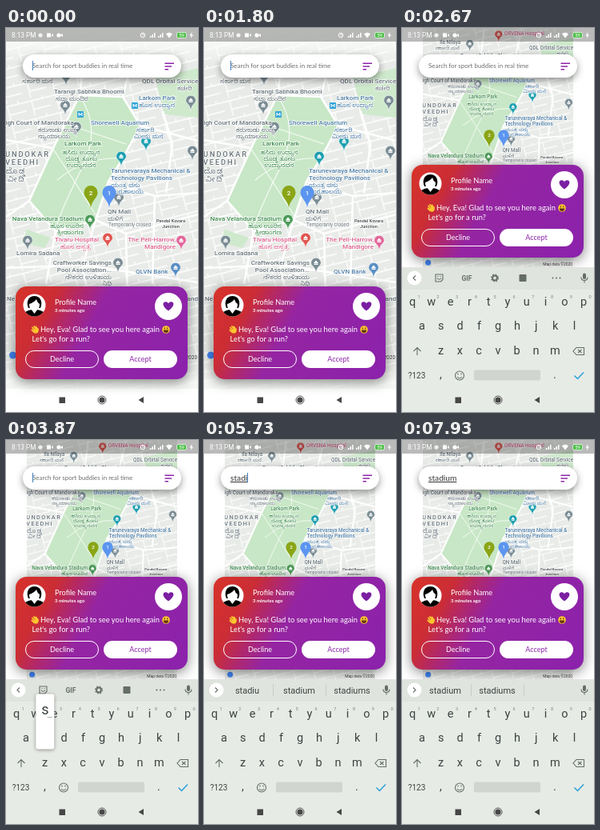
Animation, 240 px wide and 480 px high, one loop 8 s. Source, as an HTML page:

```html
<!DOCTYPE html>
<html lang="en">
<head>
<meta charset="utf-8">
<title>Search on a map</title>
<style>
html, body { margin: 0; width: 100%; height: 100%; overflow: hidden; background: #fff; }
svg { position: absolute; left: 0; top: 0; width: 240px; height: 480px; }
text { font-family: Roboto, sans-serif; }
.mid { text-anchor: middle; }
.end { text-anchor: end; }

#map { animation: map 8s step-end infinite; }
#card { animation: card 8s step-end infinite; }
#board { animation: board 8s linear infinite; }
@keyframes map {
  0% { transform: none; }
  23.3% { transform: translate(26px, -27px) scale(.783); }
}
@keyframes card {
  0% { transform: none; }
  23.3% { transform: translateY(-152px); }
}
@keyframes board {
  0%, 22.8% { transform: translateY(185px); animation-timing-function: cubic-bezier(.333, 1, .667, 1); }
  26.6%, 100% { transform: none; }
}

#map text { font-size: 8.1px; font-weight: 500; fill: #66737a; stroke: #fff; stroke-width: 1.4px; paint-order: stroke; }
#map .kn { font-size: 7.6px; font-family: "Noto Sans Kannada", "Noto Sans", sans-serif; }
#map .park { fill: #3b8a4b; }
#map .pink { fill: #dd5f8d; }
#map .blue { fill: #4f7fa8; }
#map .area { font-size: 9.4px; letter-spacing: 1.8px; }
#map .small { font-size: 6.3px; font-weight: 400; }
#map .tiny { font-size: 5.6px; fill: #3f4648; }
#map .num { font-size: 8px; fill: #fff; stroke: none; }
.pin { stroke: #fff; stroke-width: .6; }

.bar { filter: drop-shadow(0 3px 5px rgba(0, 0, 0, .42)); }
.sheet { filter: drop-shadow(0 3px 8px rgba(0, 0, 0, .5)); }
#card text { font-family: Lato, "Open Sans", sans-serif; fill: #fff; font-size: 9.4px; }
#card .name { font-size: 9.2px; }
#card .ago { font-size: 6px; font-weight: 700; }
#card .btn { font-size: 9px; }

#field { position: absolute; left: 33px; top: 39px; height: 16px; white-space: pre;
  font: 7.95px/16px Lato, "Open Sans", sans-serif; color: #6c706c; }
#field.typed { font-size: 10.2px; color: #333; }
#field.typed span { text-decoration: underline; text-decoration-thickness: 1px; text-underline-offset: 1px; }
#caret { position: absolute; left: 0; top: 2px; width: 1px; height: 12px; background: #3f7fc0; }
#field.typed #caret { left: 100%; }

#board { fill: #3c4343; }
#board .key { font-size: 14.5px; }
#board .digit { font-size: 5.6px; fill: #7d868b; }
#board .word { font-size: 11px; }
.line { fill: none; stroke: #656d67; stroke-width: 1.1; }
.pop { filter: drop-shadow(0 1px 2px rgba(0, 0, 0, .4)); }
</style>
</head>
<body>
<svg viewBox="0 0 240 480">
  <defs>
    <clipPath id="stage"><rect width="240" height="451"/></clipPath>
    <clipPath id="face"><circle cx="35.5" cy="346.5" r="14"/></clipPath>
    <pattern id="streets" width="31" height="23" patternUnits="userSpaceOnUse" patternTransform="rotate(-14)">
      <path d="M0 4H31M9 4V23M23 0V4M9 15H31" fill="none" stroke="#fff" stroke-width="1.3"/>
    </pattern>
    <linearGradient id="haze" x2="0" y2="1">
      <stop stop-color="#fbfdfa"/><stop offset=".04" stop-color="#fbfdfa" stop-opacity=".75"/>
      <stop offset=".1" stop-color="#fbfdfa" stop-opacity="0"/>
      <stop offset=".92" stop-color="#fbfdfa" stop-opacity="0"/><stop offset=".98" stop-color="#fbfdfa" stop-opacity=".7"/>
    </linearGradient>
    <linearGradient id="glow" gradientUnits="userSpaceOnUse" x1="12" y1="323" x2="227" y2="439">
      <stop stop-color="#d8332a"/><stop offset=".2" stop-color="#cb2d35"/>
      <stop offset=".31" stop-color="#b0286c"/><stop offset=".43" stop-color="#9525a2"/>
      <stop offset="1" stop-color="#8b22ac"/>
    </linearGradient>
    <g id="drop">
      <path class="pin" d="M0 9C-1-1-6.3 0-6.3-4.5A6.3 6.3 0 0 1 6.3-4.5C6.3 0 1-1 0 9Z"/>
      <path d="M-3-4L0-7.5L3-4ZM-2.5-3.5H2.5V-2H-2.5Z" fill="#fff"/>
    </g>
    <path id="flag" d="M0 19C-1 9-8.5 7-8.5-.5A8.5 8.5 0 0 1 8.5-.5C8.5 7 1 9 0 19Z"/>
  </defs>

  <g id="map">
    <g clip-path="url(#stage)">
      <rect width="240" height="451" fill="#e8ebe7"/>
      <rect width="240" height="451" fill="url(#streets)"/>
      <path d="M92 84L146 86L168 122L146 163L128 192L113 240L62 253L29 215L58 150Z" fill="#c8e7c6"/>
      <path d="M186 62L240 50V112L198 108ZM26 252L56 262L48 275L20 268Z" fill="#cfe9cd"/>
      <g fill="none" stroke="#fff" stroke-width="2.6" stroke-linejoin="round">
        <path d="M0 236L29 216L60 148L92 84L98 36M92 84L146 86L168 122L240 141M168 122L146 163L128 192L112 240L62 254L29 216"/>
        <path d="M112 240L150 257L240 233M112 240L95 300L105 340M62 254L50 320M150 257L152 340M0 140L58 150M128 192L186 210L240 206M186 210L183 320M146 86L160 30M196 104L208 145L200 206M0 300L95 296L240 318"/>
      </g>
      <path d="M58 150Q85 190 113 235M64 190Q100 160 146 163M92 85Q120 125 95 175T62 250M75 120L150 145" fill="none" stroke="#f5fbf5" stroke-width="1.2"/>

      <g fill="#7a8c94">
        <use href="#drop" x="74" y="101"/><use href="#drop" x="88" y="128"/>
        <use href="#drop" x="231" y="95"/><use href="#drop" x="233" y="158"/>
        <use href="#drop" x="75" y="64"/><use href="#drop" x="140" y="298"/>
        <use href="#drop" x="141" y="216"/><use href="#drop" x="27" y="270"/>
        <use href="#drop" x="144" y="165" fill="#1d9fb0"/><use href="#drop" x="175" y="146" fill="#1d9fb0"/>
        <use href="#drop" x="105" y="244" fill="#4b9a57"/><use href="#drop" x="212" y="304" fill="#5a8fc4"/>
        <use href="#drop" x="127" y="267" fill="#e0554f"/><use href="#drop" x="121" y="49" fill="#e0554f"/>
        <use href="#drop" x="219" y="270" fill="#e2679b"/>
      </g>
      <g fill="#31a5d9"><rect x="157" y="93" width="8" height="8" rx="1"/><rect x="89" y="104" width="8" height="8" rx="1"/></g>
      <path d="M159 99V95L161 98L163 95V99M91 110V106L93 109L95 106V110" fill="none" stroke="#fff"/>

      <text class="pink" x="130" y="46">ORVENA Hospital</text>
      <text x="27" y="60">Ila Nilaya</text><text class="kn" x="20" y="69">ಸರ್ಕಾರಿ ಮನೆ</text>
      <text x="170" y="69">QDL Orbital Service</text><text class="kn" x="214" y="78">ಕಚೇರಿ</text>
      <text x="60" y="82">Tarangi Sabhika Bhoomi</text><text class="kn" x="62" y="91">ಸಭಾ ಮಂದಿರ</text>
      <text class="blue" x="166" y="90">Larkom Park</text><text class="kn blue" x="166" y="99">ಹೊಸ ಉದ್ಯಾನ</text>
      <text class="end" x="85" y="121">High Court of Mandoraka</text>
      <text class="kn" x="40" y="130">ಕರುನಾಡು ಉಚ್ಚ</text><text class="kn" x="40" y="138">ನ್ಯಾಯಾಲಯ</text>
      <text class="blue" x="106" y="121">Shorewell Aquarium</text>
      <text class="kn blue" x="163" y="130">ಸರ್ಕಾರಿ</text><text class="kn blue" x="160" y="138">ಮೀನು ಮನೆ</text>
      <text class="park" x="73" y="147">Larkom Park</text>
      <text class="kn park mid" x="94" y="158">ಹಸಿರು ಉದ್ಯಾನ</text><text class="kn park mid" x="94" y="166">ದೊಡ್ಡ ತೋಟ</text>
      <text class="kn park mid" x="94" y="174">ಉದ್ಯಾನವನ</text>
      <text class="area" x="-1" y="161">UNDOKAR</text><text class="area" x="-1" y="171">VEEDHI</text>
      <text class="kn area" x="0" y="182">ದೊಡ್ಡ</text><text class="kn area" x="2" y="192">ವೀದಿ</text>
      <text class="blue" x="131" y="181">Tarunevaraya Mechanical &amp;</text><text class="blue" x="131" y="190">Technology Pavilions</text>
      <text class="kn blue" x="131" y="199">ಯಂತ್ರ ವಸ್ತು</text><text class="kn blue" x="131" y="207">ಸಂಗ್ರಹಾಲಯ</text>
      <text x="127" y="232">QN Mall</text><text class="kn" x="127" y="241">ಮಳಿಗೆ</text>
      <text class="small" x="128" y="248">Temporarily closed</text>
      <text class="park end" x="97" y="241">Nava Velandura Stadium</text>
      <text class="kn park end" x="97" y="250">ಹೊಸ ಊರಿನ</text><text class="kn park end" x="97" y="258">ಕ್ರೀಡಾಂಗಣ</text>
      <text class="tiny mid" x="206" y="243">Pendal Kovara</text><text class="tiny mid" x="206" y="250">Junction</text>
      <text class="pink" x="61" y="267">Tivaru Hospital</text><text class="kn pink" x="68" y="276">ಹೊಸ ಆಸ್ಪತ್ರೆ</text>
      <text class="pink end" x="212" y="267">The Pell-Harrow,</text><text class="pink end" x="212" y="276">Mandigore</text>
      <text x="13" y="284">Lomira Sadana</text>
      <text class="end" x="132" y="296">Craftworker Savings</text><text class="end" x="132" y="305">Pool Association...</text>
      <text class="kn end" x="132" y="314">ನೌಕರರ ಉಳಿತಾಯ</text><text class="kn end" x="132" y="322">ನಿಧಿ</text>
      <text class="blue" x="162" y="307">QLVN Bank</text>
      <text x="1" y="341">Ne</text><text class="end" x="240" y="341">and</text>

      <g class="mid">
        <use href="#flag" x="106" y="206" fill="#8aa515"/><text class="num" x="106" y="208.500">2</text>
        <use href="#flag" x="129" y="206" fill="#5b95f0"/><text class="num" x="129" y="208.500">1</text>
      </g>
      <circle cx="8.5" cy="409" r="4.5" fill="#4285f4"/>
      <text class="small end" x="239" y="414" style="fill:#222">Map data ©2020</text>
      <rect width="240" height="451" fill="url(#haze)"/>
    </g>
  </g>
  <rect y="451" width="240" height="29" fill="#fff"/>

  <rect width="240" height="17" fill="#000" opacity=".27"/>
  <g fill="#fff">
    <text x="7" y="12" style="font-size:8.3px">8:13 PM</text>
    <circle cx="43" cy="9" r="2.6" opacity=".8"/>
    <path d="M51 6.5H56V11.5H51ZM56.5 9L59 7V11Z"/>
    <circle cx="66" cy="9" r="2.6"/><path d="M68 9L71 7V11Z"/>
    <circle cx="171" cy="9" r="2.8" fill="none" stroke="#fff"/><path d="M171 7V9H173" fill="none" stroke="#fff" stroke-width=".8"/>
    <path id="bars" d="M180 12V10H181.500V12ZM182.500 12V8H184V12ZM185 12V6H186.500V12Z"/><use href="#bars" x="10"/>
    <path d="M200 7.5Q204 4 208 7.5L204 12.5Z"/>
    <rect x="213.500" y="5.5" width="12" height="7" rx="2" fill="#4fbf4a" stroke="#fff" stroke-width=".7"/>
    <text class="mid" x="219.500" y="11.200" style="font-size:6px">59</text>
    <path d="M232.500 5L229.500 9.500H231.500L231 13L234 8.500H232Z"/>
  </g>

  <rect class="bar" x="21" y="33" width="198" height="29" rx="14.500" fill="#fff"/>
  <path d="M198.500 44.200H210M198.500 48H207M198.500 51.800H203" stroke="#8e24aa" stroke-width="1.400"/>

  <g id="card">
    <rect class="sheet" x="12" y="323" width="215" height="116" rx="14" fill="url(#glow)"/>
    <circle cx="35.500" cy="346.500" r="14" fill="#fff"/>
    <g clip-path="url(#face)">
      <path d="M27 347C24 331 47 331 44 347L43 350H28Z"/>
      <path d="M20 362Q21 354 32 352H39Q50 354 51 362Z"/>
      <path d="M29 345Q35 343 38 339Q39 343 42 345Q42 351 38.500 353L35.500 357L32.500 353Q29 351 29 345Z" fill="#fff"/>
    </g>
    <text class="name" x="61" y="346">Profile Name</text>
    <text class="ago" x="61" y="355">3 minutes ago</text>
    <circle cx="203" cy="348" r="17" fill="#fff"/>
    <path d="M203 353.500C194 347 196 342.200 199.800 342.200Q202 342.200 203 344.200Q204 342.200 206.200 342.200C210 342.200 212 347 203 353.500Z" fill="#7b1fa2"/>
    <g stroke="#fcc62f" stroke-width="1.900" stroke-linecap="round">
      <path d="M33 374.500L36 378M35 373L38 377M37.500 373.500L39.500 377M40 376.500L39.500 379M32.500 377.500L35 380"/>
      <ellipse cx="37.300" cy="379" rx="2" ry="1.700" fill="#fcc62f"/>
    </g>
    <text x="43" y="380">Hey, Eva! Glad to see you here again</text>
    <circle cx="200" cy="377" r="4.800" fill="#fcc62f"/>
    <path d="M196.800 377.500H203.200Q203 381 200 381T196.800 377.500ZM197.800 374.500H199V376.300H197.800ZM201 374.500H202.200V376.300H201Z" fill="#5e3415"/>
    <text x="32.500" y="391.500">Let's go for a run?</text>
    <rect x="24.500" y="403.500" width="91" height="21" rx="10.500" fill="none" stroke="#fff"/>
    <text class="btn mid" x="70" y="417">Decline</text>
    <rect x="122" y="403" width="92" height="22" rx="11" fill="#fff"/>
    <text class="btn mid" x="168" y="417" style="fill:#8e24aa">Accept</text>
  </g>

  <g id="board">
    <rect y="299" width="240" height="190" fill="#e7ebe5"/>
    <rect y="299" width="240" height="28" fill="#e0e4de"/>
    <circle cx="15.500" cy="312.500" r="9" fill="#fff"/>
    <path id="arrow" class="line"/>
    <g id="tools">
      <path class="line" d="M42 308H51V314.500L48.500 317H42ZM44 312.500Q46.500 316 49 312.500M45 310V311M48 310V311"/>
      <text class="mid" x="81" y="315.800" style="font-size:8.500px;font-weight:700;fill:#656d67">GIF</text>
      <circle class="line" cx="116" cy="312.500" r="2.900" style="stroke-width:2"/>
      <circle class="line" cx="116" cy="312.500" r="4.500" stroke-dasharray="1.800 1.734"/>
      <rect x="146.500" y="308" width="9" height="9" rx="1" fill="#656d67"/>
      <path d="M188.500 312.500H198" stroke="#656d67" stroke-width="2" stroke-linecap="round" stroke-dasharray="0 4.500"/>
    </g>
    <g id="words" class="mid">
      <text class="word" x="54" y="316.500"></text><text class="word" x="119" y="316.500"></text><text class="word" x="185" y="316.500"></text>
      <path d="M86.500 305V320M152.500 305V320" stroke="#c8cdc8"/>
    </g>
    <rect x="226" y="306.500" width="4" height="7.500" rx="2" fill="#656d67"/>
    <path class="line" d="M224 311.500Q224 315.500 228 315.500T232 311.500M228 315.500V318.500"/>
    <g id="keys" class="mid"></g>
    <path class="line" d="M19 409V399.500M14.500 404L19 399.500L23.500 404M218 399.500H227.500V408.500H218L214 404ZM220 402L224.500 406M224.500 402L220 406"/>
    <text class="mid" x="18.500" y="438" style="font-size:10px">?123</text>
    <text class="key mid" x="48.500" y="437.500">,</text>
    <circle class="line" cx="72" cy="434.500" r="5.500"/>
    <path class="line" d="M69 436Q72 439.500 75 436M70 431.500V433.500M74 431.500V433.500"/>
    <rect x="90" y="427.500" width="83" height="13" rx="2" fill="#d0d5cf"/>
    <text class="key mid" x="191" y="437.500">.</text>
    <path d="M215.500 434.500L219.500 438.500L227 430.500" fill="none" stroke="#2a9fd6" stroke-width="1.500"/>
    <g id="pop" class="pop mid">
      <rect x="-11.500" y="-55" width="23" height="69" rx="3" fill="#fff"/>
      <text y="-30" style="font-size:18px"></text>
      <path d="M3.500-26H9" stroke="#596167" stroke-dasharray="1 1"/>
    </g>
  </g>

  <g fill="#474747">
    <rect x="66.500" y="461.500" width="7.500" height="7.500"/>
    <circle cx="120" cy="465" r="5" fill="none" stroke="#474747" stroke-width=".9"/><circle cx="120" cy="465" r="3.600"/>
    <path d="M165.500 465L172 461V469Z"/>
  </g>
</svg>
<div id="field"><span></span><i id="caret"></i></div>

<script>
const LOOP = 8000, HINT = 'Search for sport buddies in real time';
const rows = [['qwertyuiop', 13, 342.5], ['asdfghjkl', 25, 372.5], ['zxcvbnm', 48.5, 403.5]];
// key, pressed at, released at
const presses = [['s', 3800, 4000], ['t', 4070, 4200], ['a', 4670, 4800], ['d', 5000, 5130],
  ['i', 5390, 5530], ['u', 5830, 5950], ['m', 6270, 6400]];
const hints = {
  s: ['s', 'so', 'S'], st: ['st', 'at', 'St'], sta: ['sta', 'stay', 'star'],
  stad: ['stad', 'stadium', 'stage'], stadi: ['stadiu', 'stadium', 'stadiums'],
  stadiu: ['stadiu', 'stadium', 'stadiums'], stadium: ['stadium', 'stadiums', '']
};
const $ = id => document.getElementById(id);
const field = $('field'), label = field.firstChild, caret = $('caret'), pop = $('pop');
const popText = pop.querySelector('text'), slots = $('words').querySelectorAll('text');
const place = {};

let markup = '';
rows.forEach(([chars, x0, y], row) => [...chars].forEach((c, i) => {
  const x = x0 + i * 23.8;
  place[c] = [x, y];
  markup += `<text class="key" x="${x}" y="${y + 4.5}">${c}</text>`;
  if (!row) markup += `<text class="digit" x="${x + 8}" y="${y - 5}">${(i + 1) % 10}</text>`;
}));
$('keys').innerHTML = markup;

const show = (el, on) => el.style.visibility = on ? 'visible' : 'hidden';

function draw(t) {
  const done = presses.filter(p => t >= p[2]);
  const typed = done.map(p => p[0]).join('');
  const held = presses.find(p => t >= p[1] && t < p[2]);

  field.className = typed ? 'typed' : '';
  label.textContent = typed || HINT;
  const since = typed ? t - done[done.length - 1][2] : t + 200;
  show(caret, since % 1000 < 500);

  show($('tools'), !typed);
  show($('words'), typed);
  (hints[typed] || []).forEach((w, i) => slots[i].textContent = w);
  $('arrow').setAttribute('d', typed ? 'M14 309.500L17 312.500L14 315.500' : 'M17 309.500L14 312.500L17 315.500');

  show(pop, held);
  if (held) {
    popText.textContent = held[0];
    pop.setAttribute('transform', `translate(${place[held[0]]})`);
  }
}

let start;
function tick(now) {
  start ??= now;
  draw((now - start) % LOOP);
  requestAnimationFrame(tick);
}
draw(0);
requestAnimationFrame(tick);
</script>
</body>
</html>
```
